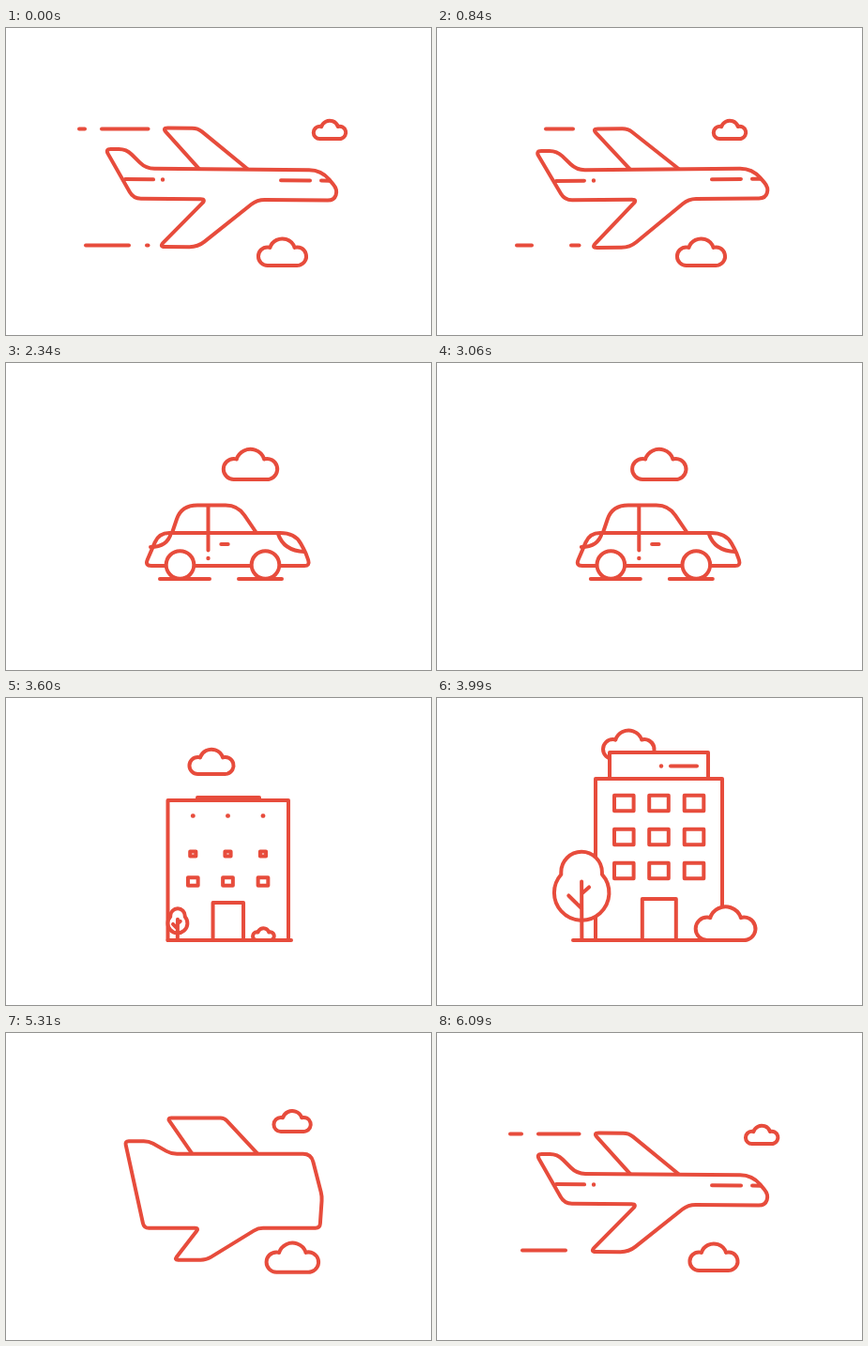
Animation of 453x327 px, one loop 6.12 s. Source, as an HTML page with a canvas:

```html
<!DOCTYPE html>
<html lang="en">
<head>
<meta charset="utf-8">
<title>Plane, car, building</title>
<style>
html, body { margin: 0; width: 100%; height: 100%; overflow: hidden; background: #fff; }
canvas { display: block; width: 453px; height: 327px; }
</style>
</head>
<body>
<canvas id="stage" width="453" height="327"></canvas>
<script>
const c = document.getElementById('stage').getContext('2d');
const LOOP = 6120, STEP = 30, PI = Math.PI;
const INK = '#e74c3c';

const clamp = v => Math.max(0, Math.min(1, v));
const smooth = u => u * u * (3 - 2 * u);
const out = u => 1 - (1 - u) ** 3;
const line = u => u;
const mix = (a, b, u) => a + (b - a) * u;
const ramp = (t, a, b) => clamp((t - a) / (b - a));

// Keyframe rows are [time, ...values].
function key(t, rows, ease = smooth) {
  if (t <= rows[0][0]) return rows[0].slice(1);
  for (let i = 1; i < rows.length; i++) {
    const a = rows[i - 1], b = rows[i];
    if (t <= b[0]) {
      const u = ease(ramp(t, a[0], b[0]));
      return a.slice(1).map((v, n) => mix(v, b[n + 1], u));
    }
  }
  return rows[rows.length - 1].slice(1);
}

// Shows a part between two times with growth at both ends.
const grow = (t, a, b, x, y) => out(ramp(t, a, b)) * (1 - smooth(ramp(t, x, y)));

// Corner = [x, y, cut length]
const BODY = {
  plane: [[105.5, 130, 6], [128, 130, 8], [149, 150.5, 9], [336, 150.5, 13], [353.5, 171, 7], [350, 182.5, 7],
    [268, 182.5, 8], [205, 233.5, 9], [164, 233.5, 6], [213.5, 182.5, 6], [136, 182.5, 8]],
  dash: [[169, 158, 6], [200, 158, 0], [230, 158, 0], [292, 158, 11], [308, 179, 7], [305, 190, 7],
    [270, 190, 6], [215, 191, 8], [190, 190, 4], [175, 190, 0], [155, 190, 7]],
  car: [[163, 181, 11], [190, 181, 0], [215, 181, 0], [308, 181, 16], [320, 203, 6], [324, 216, 6],
    [270, 216, 0], [215, 216, 0], [200, 216, 0], [180, 216, 0], [148, 216, 7]],
  block: [[172.5, 109, 0], [200, 109, 0], [230, 109, 0], [301, 109, 0], [301, 180, 0], [301, 258, 0],
    [270, 258, 0], [230, 258, 0], [210, 258, 0], [190, 258, 0], [172.5, 258, 0]],
  tower: [[169, 86, 0], [200, 86, 0], [230, 86, 0], [304, 86, 0], [304, 180, 0], [304, 258, 0],
    [270, 258, 0], [230, 258, 0], [210, 258, 0], [190, 258, 0], [169, 258, 0]]
};

// Wing, cabin and roof share one four-point line.
const TOP = {
  plane: [[206, 150.5, 0], [166, 107, 6], [204, 107, 6], [258, 150.5, 0]],
  dash: [[198, 158, 0], [211, 128, 9], [245, 128, 9], [265, 158, 0]],
  car: [[177, 181, 0], [187, 151.5, 17], [247, 151.5, 13], [267, 181, 0]],
  block: [[204, 109, 0], [204, 106, 0], [270, 106, 0], [270, 109, 0]],
  tower: [[184, 86, 0], [184, 58, 0], [289, 58, 0], [289, 86, 0]]
};

const POSES = [[0, 'plane'], [1350, 'plane'], [1530, 'dash'], [1740, 'car'], [3300, 'car'],
  [3600, 'block'], [3780, 'tower'], [4980, 'tower'], [5520, 'plane'], [LOOP, 'plane']];

function pose(t, set) {
  let i = 1;
  while (t > POSES[i][0]) i++;
  const a = set[POSES[i - 1][1]], b = set[POSES[i][1]];
  const u = smooth(ramp(t, POSES[i - 1][0], POSES[i][0]));
  return a.map((p, n) => p.map((v, k) => mix(v, b[n][k], u)));
}

function rounded(pts, closed) {
  const n = pts.length;
  const toward = (p, q, d) => {
    const len = Math.hypot(q[0] - p[0], q[1] - p[1]) || 1;
    const f = Math.min(d / len, 0.5);
    return [mix(p[0], q[0], f), mix(p[1], q[1], f)];
  };
  c.beginPath();
  pts.forEach((p, i) => {
    if (!closed && (i === 0 || i === n - 1)) return c.lineTo(p[0], p[1]);
    c.lineTo(...toward(p, pts[(i + n - 1) % n], p[2]));
    c.quadraticCurveTo(p[0], p[1], ...toward(p, pts[(i + 1) % n], p[2]));
  });
  if (closed) c.closePath();
  c.fill();
  c.stroke();
}

// Builds a path in scaled space, then strokes it at the normal width.
function shape(x, y, s, angle, build, fill = true) {
  if (s < 0.03) return;
  c.save();
  c.translate(x, y);
  c.rotate(angle);
  c.scale(s, s);
  c.beginPath();
  build();
  c.restore();
  if (fill) c.fill();
  c.stroke();
}

function seg(x1, y1, x2, y2, k = 1) {
  if (k < 0.02) return;
  const mx = (x1 + x2) / 2, my = (y1 + y2) / 2;
  c.beginPath();
  c.moveTo(mix(mx, x1, k), mix(my, y1, k));
  c.lineTo(mix(mx, x2, k) + 0.01, mix(my, y2, k));
  c.stroke();
}

function dot(x, y, k) {
  if (k < 0.05) return;
  c.save();
  c.fillStyle = INK;
  c.beginPath();
  c.arc(x, y, 2.2 * k, 0, 2 * PI);
  c.fill();
  c.restore();
}

function cloudPath() {
  c.arc(-17.7, -11, 11, PI / 2, 2 * PI - 1.284);
  c.arc(0, -16.5, 15.6, PI + 0.324, 2 * PI - 0.324);
  c.arc(17.7, -11, 11, -1.857, PI / 2);
  c.closePath();
}

function farCloud(t) {
  const [x] = key(t, [[0, 345], [840, 312], [1380, 296], [1530, 294.5], [2340, 260.5], [3600, 219],
    [4620, 180.5], [4890, 171], [5510, 369], [LOOP, 345]], line);
  const [y, s] = key(t, [[1380, 118, 0.6], [1530, 130, 1.37], [1860, 124, 1], [3300, 124, 1],
    [3600, 81, 0.82], [3780, 65, 0.95], [4890, 65, 0.95], [5510, 118, 0.6]]);
  shape(x, y, s, 0, cloudPath);
}

function nearCloud(t) {
  if (t > 1540 && t < 3500) return;
  if (t < 3000) {
    const [x] = key(t, [[0, 294.5], [840, 281.5], [1530, 274.5]], line);
    const [y, s] = key(t, [[1370, 253, 0.89], [1530, 239, 0.05]]);
    shape(x, y, s, 0, cloudPath);
  } else {
    const g = out(ramp(t, 3520, 4110));
    const [x, y, s] = t < 4980 ? [256 + 52 * g, 258, 1.12 * g]
      : t < 5520 ? key(t, [[4980, 308, 258, 1.12], [5520, 304, 253, 0.89]])
      : [294.5 + (LOOP - t) * 0.0158, 253, 0.89];
    shape(x, y, s, 0, cloudPath);
  }
}

// Dashes sit on a strip sliding left and show through a window.
function speedLines(t) {
  if (t > 1540 && t < 5690) return;
  const now = t > 3000 ? t - LOOP : t;
  const k = 1 - ramp(t < 3000 ? t : 0, 1380, 1538);
  const strips = [
    [107.5, 78, [[20, 84], [102, 190], [212, 240], [284, 313], [335, 382], [400, 450]]],
    [231.5, 85, [[0, 62], [85, 131], [150, 215], [235, 269], [311, 360], [382, 410]]]
  ];
  c.save();
  c.lineWidth = Math.max(0.8, 4 * k);
  for (const [y, left, dashes] of strips) {
    const lo = mix(119, left, k), hi = mix(119, 151.5, k);
    for (const [a, b] of dashes) {
      const x1 = Math.max(lo, a - now * 0.2), x2 = Math.min(hi, b - now * 0.2);
      if (x2 >= x1) seg(x1, y, x2, y);
    }
  }
  c.restore();
}

function planeParts(k) {
  seg(127, 162, 157, 162, k);
  dot(167, 162, k);
  seg(293, 161.7, 324, 161.7, k);
  seg(336, 161.7, 345, 161.7, k);
}

function carParts(t) {
  const k = grow(t, 1560, 1800, 3240, 3420);
  if (t > 1500 && t < 3420) {
    const [x, y, h] = key(t, [[1530, 215.3, 169.5, 1.3], [1740, 233, 193, 3.7]]);
    seg(x - h, y, x + h, y, t < 2000 ? 1 : k);
  }
  if (k < 0.03) return;
  c.beginPath();
  c.moveTo(215.5, 152);
  c.lineTo(215.5, mix(152, 199.5, k));
  c.stroke();
  dot(215.5, 208, k);
  const lamp = (x, y, cx, cy, ex, ey) => {
    c.beginPath();
    c.moveTo(x, y);
    c.quadraticCurveTo(mix(x, cx, k), mix(y, cy, k), mix(x, ex, k), mix(y, ey, k));
    c.stroke();
  };
  lamp(290, 182, 296, 200, 318, 201);
  lamp(176, 181, 172, 196, 154, 196);
  for (const x of [185.5, 276.5]) shape(x, 215, k, 0, () => c.arc(0, 0, 14.8, 0, 2 * PI));
  seg(164, 230, 217, 230, k);
  seg(248, 230, 294, 230, k);
}

function towerParts(t) {
  if (t < 3400 || t > 5250) return;
  const gone = 1 - smooth(ramp(t, 4980, 5190));
  const rise = 1 - smooth(ramp(t, 3600, 3780));
  const rows = [[112, 13.5, 3592], [148, 18, 3540], [184, 11.5, 3496]];
  for (const [y, lift, start] of rows) {
    const s = ramp(t, start, start + 200) * gone;
    for (const x of [199.3, 236.5, 274]) {
      shape(x, y + lift * rise, s, 0, () => c.rect(-10.3, -8.2, 20.6, 16.4));
    }
  }
  const [w, h] = key(t, [[3400, 0, 0], [3600, 32.5, 40], [3780, 36, 44]]);
  shape(236.8, 258, gone, 0, () => c.rect(-w / 2, -h, w, h));
  const sign = ramp(t, 3690, 3870) * gone;
  dot(239, 72.5, sign);
  seg(249, 72.5, 277, 72.5, sign);
  if (t > 3580 && gone > 0.05) {
    const [x] = key(t, [[3600, 172.5], [3840, 145]]);
    seg(x, 258, 304, 258, gone);
  }
}

function tree(t) {
  const g = out(ramp(t, 3520, 4110));
  const s = g * (1 - smooth(ramp(t, 4980, 5220)));
  const x = 198.6 - 44.6 * g;
  const sway = 0.008 * Math.sin((t - 4620) * 2 * PI / 1500);
  shape(x, 258, s, sway, () => {
    c.arc(0, -73, 22, PI, 2 * PI);
    c.arc(0, -51, 29.5, -0.729, PI + 0.729);
    c.closePath();
  });
  shape(x, 258, s, sway, () => {
    c.moveTo(0, 0); c.lineTo(0, -63);
    c.moveTo(0, -34); c.lineTo(-14, -48);
    c.moveTo(0, -50); c.lineTo(8, -57);
  }, false);
}

function draw(t) {
  c.fillStyle = '#fff';
  c.fillRect(0, 0, 453, 327);
  c.strokeStyle = INK;
  c.lineWidth = 4;
  c.lineCap = c.lineJoin = 'round';

  farCloud(t);
  speedLines(t);

  const [flight] = key(t, [[1350, 1], [1500, 0], [5340, 0], [5600, 1]]);
  const [drive] = key(t, [[1740, 0], [1900, 1], [3150, 1], [3300, 0]]);
  const tilt = flight * 0.0087 * Math.cos(2 * PI * (t > 3000 ? t - LOOP : t) / 1680);
  const sway = drive * 0.5 * (Math.cos(2 * PI * (t - 2340) / 630) - 1);

  c.save();
  c.translate(230 + sway, 166);
  c.rotate(tilt);
  c.translate(-230, -166);
  rounded(pose(t, TOP), false);
  rounded(pose(t, BODY), true);
  planeParts(flight);
  carParts(t);
  c.restore();

  towerParts(t);
  tree(t);
  nearCloud(t);
}

function tick() {
  const t = performance.now() % LOOP;
  draw(Math.floor(t / STEP) * STEP);
  requestAnimationFrame(tick);
}
tick();
</script>
</body>
</html>
```
